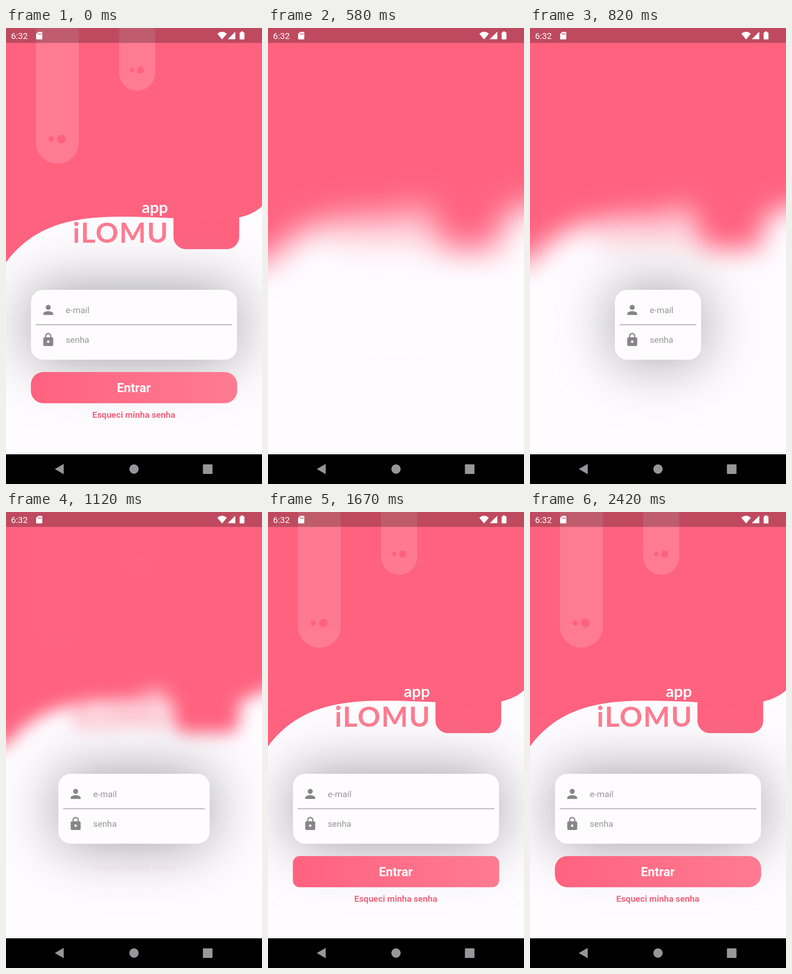
An HTML page for the animation above (2.55 s loop, 561 by 998 pixels).

```html
<!DOCTYPE html>
<html lang="pt">
<head>
<meta charset="utf-8">
<title>Login</title>
<style>
  html, body { margin: 0; width: 100%; height: 100%; overflow: hidden; background: #fefcff; }
  svg { display: block; }
  text { font-family: Roboto, sans-serif; font-size: 19.1px; }
  .brand { font-family: Lato, sans-serif; font-weight: 700; text-anchor: end; }
  .bold { font-weight: 700; text-anchor: middle; }
  .pink { fill: #ff627f; }
  .light { fill: #ff7b91; }
  .grey { fill: #878589; }
  .hint { fill: #969498; }
  #shadow { filter: blur(64px); }
  #line { filter: blur(.6px); }
</style>
</head>
<body>
<svg width="100%" height="100%" viewBox="0 0 561 998">
  <defs>
    <linearGradient id="glow">
      <stop stop-color="#ff627f"/>
      <stop offset="1" stop-color="#ff7b91"/>
    </linearGradient>
  </defs>
  <rect width="561" height="998" fill="#fefcff"/>

  <g id="backdrop">
    <path class="pink" d="M-200-200V513H0C60 432 145 413 250 413C335 413 400 419 460 419.500C510 420 542 408 561 390H760V-200Z"/>
    <rect class="pink" x="367" y="354" width="144" height="130" rx="27"/>
    <text class="brand" x="355" y="405" fill="#fdfcfa" style="font-size:35px">app</text>
    <text class="brand light" x="357" y="470" style="font-size:62px;letter-spacing:2px">iLOMU</text>
  </g>

  <g id="details">
    <rect class="light" x="65.500" y="-60" width="94" height="357" rx="47"/>
    <circle class="pink" cx="99" cy="243" r="6"/>
    <circle class="pink" cx="121.500" cy="243" r="9.500"/>
    <rect class="light" x="248" y="-60" width="79" height="197.500" rx="39.500"/>
    <circle class="pink" cx="276.500" cy="92" r="5"/>
    <circle class="pink" cx="295" cy="92" r="8"/>
  </g>

  <rect id="shadow" y="573" height="153" rx="27.300" fill="#9a989b"/>
  <svg id="card" y="573" height="153">
    <rect id="panel" height="153" rx="27.300" fill="#fefcff"/>
    <g class="grey">
      <path transform="translate(21.700 27.600) scale(1.365)" d="M12 12c2.210 0 4-1.790 4-4s-1.790-4-4-4-4 1.790-4 4 1.790 4 4 4zm0 2c-2.670 0-8 1.340-8 4v2h16v-2c0-2.660-5.330-4-8-4z"/>
      <path transform="translate(21.700 93) scale(1.365)" d="M18 8h-1V6c0-2.760-2.240-5-5-5S7 3.240 7 6v2H6c-1.100 0-2 .9-2 2v10c0 1.100.9 2 2 2h12c1.100 0 2-.9 2-2V10c0-1.100-.9-2-2-2zm-6 9c-1.100 0-2-.9-2-2s.9-2 2-2 2 .9 2 2-.9 2-2 2zm3.100-9H8.900V6c0-1.710 1.390-3.100 3.100-3.100 1.710 0 3.100 1.390 3.100 3.100v2z"/>
    </g>
    <rect id="line" x="10.500" y="74.800" height="3" fill="#c6c4c8"/>
    <svg id="hints" x="76" height="153">
      <text class="hint" x=".5" y="51">e-mail</text>
      <text class="hint" x=".5" y="116.300">senha</text>
    </svg>
  </svg>

  <rect id="button" x="54.500" y="753" width="452" fill="url(#glow)"/>
  <text id="label" class="bold" x="280" fill="#fff" style="font-size:27.3px">Entrar</text>
  <text id="link" class="bold" x="280" fill="#f2627d">Esqueci minha senha</text>

  <rect width="561" height="32.700" fill="#000" opacity=".25"/>
  <g fill="#fff">
    <text x="11" y="24">6:32</text>
    <path fill-rule="evenodd" d="M70.500 8.500H78q1.500 0 1.500 1.500V23.500q0 1.500-1.500 1.500H67.500q-1.500 0-1.500-1.500V13ZM70 11.500v3.500h1.500v-3.500zM73 11.500v3.500h1.500v-3.500zM76 11.500v3.500h1.500v-3.500z"/>
    <path d="M463 12.500Q473.500 4 484 12.500L473.500 25ZM486 24.500L502.500 8V24.500Z"/>
    <path d="M515 7.500h4.500v2h2q1 0 1 1V24q0 1-1 1H513q-1 0-1-1V10.500q0-1 1-1h2z"/>
  </g>

  <rect y="933" width="561" height="65"/>
  <g fill="#99969a">
    <path d="M107 965.300L126.500 954V976.500Z"/>
    <circle cx="280.500" cy="965.300" r="10.200"/>
    <rect x="431.500" y="955" width="21" height="21" rx="1.500"/>
  </g>
</svg>
<script>
const LOOP = 2550, CENTER = 280.5, DP = 1.365;
// Restart time and uneven playback: [ms, progress]
const PACE = [[580, 0], [670, .083], [1120, .282], [1330, .533], [1670, .82], [1885, 1]];

const $ = id => document.getElementById(id);
const set = (id, attrs) => {
  for (const name in attrs) $(id).setAttribute(name, attrs[name]);
};
const interval = (p, from, to) => Math.min(1, Math.max(0, (p - from) / (to - from)));

function bezier(x1, y1, x2, y2) {
  const at = (a, b, s) => 3 * a * s * (1 - s) ** 2 + 3 * b * s * s * (1 - s) + s ** 3;
  return x => {
    let low = 0, high = 1;
    for (let i = 0; i < 24; i++) {
      const mid = (low + high) / 2;
      if (at(x1, x2, mid) < x) low = mid; else high = mid;
    }
    return at(y1, y2, high);
  };
}
const ease = bezier(.25, .1, .25, 1);
const easeInOutQuint = bezier(.86, 0, .07, 1);
const decelerate = p => 1 - (1 - p) ** 2;

function progress(ms) {
  if (ms < PACE[0][0]) return 1;
  const i = PACE.findIndex(([time]) => time > ms);
  if (i < 0) return 1;
  const [t0, p0] = PACE[i - 1], [t1, p1] = PACE[i];
  return p0 + (p1 - p0) * (ms - t0) / (t1 - t0);
}

function draw(p) {
  const sigma = 35 * (1 - ease(p));
  $('backdrop').style.filter = sigma > .05 ? `blur(${sigma}px)` : 'none';
  const fade = easeInOutQuint(p);
  set('details', { opacity: fade });

  const width = Math.min(452, 500 * DP * decelerate(p));
  const x = CENTER - width / 2;
  set('shadow', { x, width });
  set('card', { x, width });
  set('panel', { width });
  set('line', { width: Math.max(0, width - 21) });
  set('hints', { width: Math.max(0, width - 109) });

  const height = 50 * DP * interval(p, .5, .7);
  set('button', { height, rx: 20 * DP * interval(p, .6, 1) });
  set('label', { y: 763.3 + height / 2, opacity: interval(p, .6, .8) });
  set('link', { y: 784.8 + height, opacity: fade });
}

function frame() {
  draw(progress(performance.now() % LOOP));
  requestAnimationFrame(frame);
}
frame();
</script>
</body>
</html>
```
